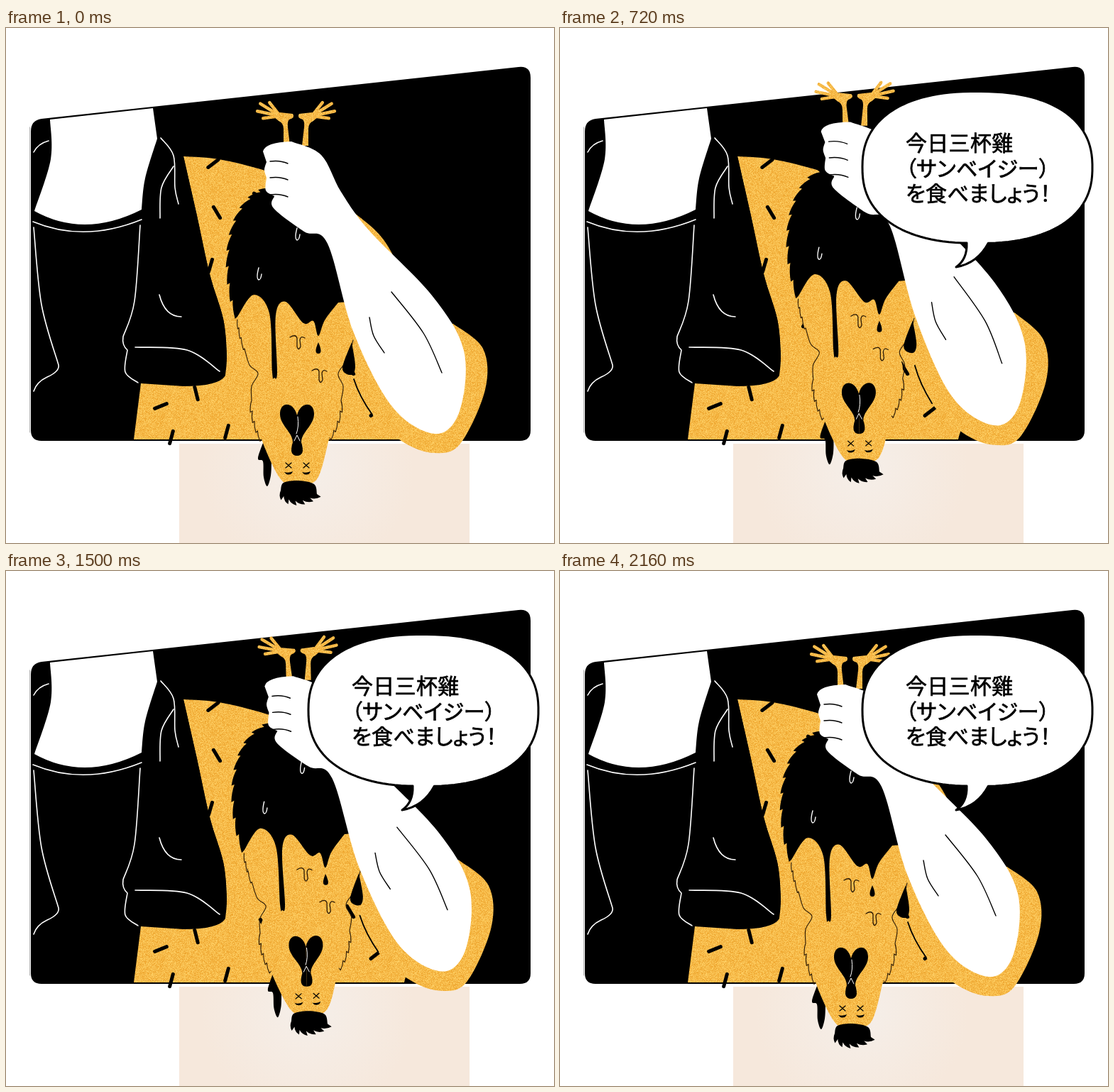
Recreate the animation shown at these times as an HTML page with a canvas. Size 772 by 726 pixels, loop 2340 ms.

```html
<!DOCTYPE html>
<html lang="ja">
<head>
<meta charset="utf-8">
<style>
html, body { margin: 0; width: 100%; height: 100%; overflow: hidden; background: #fff; }
canvas { position: absolute; left: 0; top: 0; }
#words {
  position: absolute; left: 487px; top: 143px; color: #000; white-space: pre;
  font: 500 30px/35.5px "Noto Sans CJK JP", "Noto Sans CJK", sans-serif;
  font-feature-settings: "palt"; letter-spacing: .3px; -webkit-text-stroke: .7px #000;
}
</style>
</head>
<body>
<canvas id="stage" width="772" height="726"></canvas>
<div id="words">今日三杯雞
（サンベイジー）
を食べましょう！</div>
<script>
const ctx = document.getElementById('stage').getContext('2d');
const words = document.getElementById('words');
const LOOP = 2340, STEP = 60;
const BLACK = '#000', WHITE = '#fff', INK = '#2b1a05';

// Seeded grain used for every yellow surface
function makeGrain() {
  const size = 160, tile = document.createElement('canvas');
  tile.width = tile.height = size;
  const g = tile.getContext('2d'), img = g.createImageData(size, size);
  let seed = 7;
  for (let i = 0; i < img.data.length; i += 4) {
    seed = (seed * 16807) % 2147483647;
    const n = seed / 2147483647 - 0.5;
    img.data.set([246 + n * 18, 186 + n * 44, 73 + n * 56, 255], i);
  }
  g.putImageData(img, 0, 0);
  return ctx.createPattern(tile, 'repeat');
}
const YELLOW = makeGrain();

// Point transforms
const still = (x, y) => [x, y];
const shift = (w, dx, dy) => (x, y) => w(x + dx, y + dy);
const mirror = (w, axis) => (x, y) => w(2 * axis - x, y);

// Maps the bone a-b onto a2-b2: stretches along it, bows sideways
function makeWarp(a, b, a2, b2, bend) {
  const dx = b[0] - a[0], dy = b[1] - a[1], rest = Math.hypot(dx, dy);
  const ex = b2[0] - a2[0], ey = b2[1] - a2[1], len = Math.hypot(ex, ey);
  return (x, y) => {
    const px = x - a[0], py = y - a[1];
    const u = (px * dx + py * dy) / rest ** 2;
    const v = ((px * dy - py * dx) / rest + bend * Math.max(0, 4 * u * (1 - u))) / len;
    return [a2[0] + u * ex + v * ey, a2[1] + u * ey - v * ex];
  };
}

// Absolute path commands; R is a smooth curve through its points
function trace(d, warp) {
  let cur;
  ctx.beginPath();
  for (const [, cmd, args] of d.matchAll(/([MLQCRZ])([^MLQCRZ]*)/g)) {
    const n = (args.match(/-?[\d.]+/g) || []).map(Number), pts = [];
    for (let i = 0; i < n.length; i += 2) pts.push(warp(n[i], n[i + 1]));
    if (cmd === 'Z') { ctx.closePath(); continue; }
    if (cmd === 'M') ctx.moveTo(...pts[0]);
    if (cmd === 'L') pts.forEach(p => ctx.lineTo(...p));
    if (cmd === 'Q') ctx.quadraticCurveTo(...pts.flat());
    if (cmd === 'C') ctx.bezierCurveTo(...pts.flat());
    if (cmd === 'R') {
      const k = [cur, ...pts];
      for (let i = 0; i < k.length - 1; i++) {
        const p = k[Math.max(i - 1, 0)], q = k[i], r = k[i + 1];
        const s = k[Math.min(i + 2, k.length - 1)];
        ctx.bezierCurveTo(
          q[0] + (r[0] - p[0]) / 6, q[1] + (r[1] - p[1]) / 6,
          r[0] - (s[0] - q[0]) / 6, r[1] - (s[1] - q[1]) / 6, r[0], r[1]);
      }
    }
    cur = pts[pts.length - 1];
  }
}
function fill(d, color, warp = still) {
  trace(d, warp);
  ctx.fillStyle = color;
  ctx.fill();
}
function line(d, color, width, warp = still) {
  trace(d, warp);
  ctx.strokeStyle = color;
  ctx.lineWidth = width;
  ctx.stroke();
}

// Tufts along a cubic curve, continuing the current path
function fur(c, count, depth) {
  const at = t => [0, 1].map(k => (1 - t) ** 3 * c[k] + 3 * t * (1 - t) ** 2 * c[k + 2] +
    3 * t * t * (1 - t) * c[k + 4] + t ** 3 * c[k + 6]);
  let d = '';
  for (let i = 1; i <= count; i++) {
    const a = at((i - 1) / count), b = at(i / count);
    const len = Math.hypot(b[0] - a[0], b[1] - a[1]);
    const tx = (b[0] - a[0]) / len, ty = (b[1] - a[1]) / len, lean = Math.abs(depth) / 2;
    const out = [
      (a[0] + b[0]) / 2 + ty * depth, (a[1] + b[1]) / 2 - tx * depth,
      b[0] + ty * depth + tx * lean, b[1] - tx * depth + ty * lean, ...b
    ].map(n => n.toFixed(1));
    d += `Q${out.slice(0, 4).join(' ')} L${out.slice(4).join(' ')} `;
  }
  return d;
}

// Eases from one turning point [time, value] to the next
function sway(turns, s) {
  let i = 1;
  while (i < turns.length - 1 && s > turns[i][0]) i++;
  const [t0, a] = turns[i - 1], [t1, b] = turns[i];
  const u = Math.min(Math.max((s - t0) / (t1 - t0), 0), 1);
  return a + (b - a) * (1 - Math.cos(Math.PI * u)) / 2;
}

// One shake: everything follows the hand's drop, the head's swing and the elbow's push
function poseAt(t) {
  const start = t < 1140 ? 60 : 1140, s = t - start, end = t < 1140 ? 900 : 1020;
  const drop = sway([[45, 0], [200, 55], [405, -20], [575, 57], [680, -36], [end, 0]], s);
  const swing = sway([[45, 0], [280, 30], [450, -5], [630, 12], [end, 0]], s);
  const push = sway([[45, 0], [220, 27], [360, 8], [560, 20], [700, 6], [end, 0]], s);
  const fist = [362, 172], elbow = [614, 486], feet = [408, 124], head = [410, 617];
  const move = (p, dx, dy) => [p[0] + dx, p[1] + dy];
  return {
    arm: makeWarp(fist, elbow, move(fist, -0.2 * drop, drop),
      move(elbow, push, 0.27 * drop - 0.65 * push), -0.22 * drop),
    bird: makeWarp(feet, head, move(feet, -0.24 * drop, drop),
      move(head, swing, 0.9 * drop - 0.5 * swing), 0)
  };
}

function drawRoom() {
  ctx.fillStyle = WHITE;
  ctx.fillRect(0, 0, 772, 726);
  const glow = ctx.createRadialGradient(425, 620, 10, 425, 620, 150);
  glow.addColorStop(0, '#f5eee8');
  glow.addColorStop(1, '#f6e8dc');
  ctx.fillStyle = glow;
  ctx.fillRect(244, 586, 409, 140);
  line('M33.5 140 L33.5 570', '#aaa', 1);
  fill('M35 146 Q35 130 50 128 L722 55 Q739 53 739 70 L739 567 Q739 582 724 582 L50 582 Q35 582 35 567 Z', BLACK);
}

function drawRug() {
  fill('M250 181 R268 260 287 347 306 410 311 460 309 490 Q300 505 250 505 L190 501 L180 580 L561 580 ' +
    'R588 460 545 320 490 260 430 224 365 201 300 185 250 181 Z', YELLOW);
  const dash = (x, y, degrees) => {
    const a = degrees * Math.PI / 180, dx = 9 * Math.cos(a), dy = 9 * Math.sin(a);
    line(`M${x - dx} ${y - dy} L${x + dx} ${y + dy}`, BLACK, 5);
  };
  [[292, 191, -37], [297, 260, 59], [288, 335, -74], [218, 533, -22], [268, 515, 76], [233, 577, -75],
    [311, 569, -75], [357, 238, 33], [363, 499, 59], [521, 541, -38], [485, 480, 59], [347, 413, -60],
    [556, 347, -38]].forEach(d => dash(...d));
  ctx.fillStyle = BLACK;
  ctx.fillRect(180, 580, 382, 2);
  fill('M250 181 R268 260 287 347 306 410 311 460 L250 470 Z', BLACK);
}

function drawLeg() {
  fill('M62 129 R63 185 40 258 Q110 297 191 256 R196 212 213 156 L207 113 Z', WHITE);
  const seam = d => line(d, WHITE, 1.6);
  seam('M39 175 Q45 163 60 159');
  seam('M218 155 R236 180 238 225 243 248');
  seam('M236 195 R219 225 217 268');
  seam('M38 273 Q110 303 191 270');
  seam('M39 281 R50 390 74 475 Q76 484 58 492 Q43 499 39 512');
  seam('M189 278 R181 385 165 435 Q163 447 171 454 R168 485 186 500');
  seam('M182 450 R255 454 301 484');
  seam('M216 376 Q224 407 247 407');
}

function drawFeet(w) {
  fill('M391 166 L391 142 Q391 134 384 131 L376 124 L386 119 L404 121 Q408 126 399 129 Q396 132 397 140 L400 166 Z', YELLOW, w);
  for (let i = 0; i < 4; i++) {
    const a = (172 + 20 * i) * Math.PI / 180, len = 24 + 10 * Math.sin(Math.PI * i / 3);
    line(`M386 124 L${386 + len * Math.cos(a)} ${124 + len * Math.sin(a)}`, YELLOW, 4.5, w);
  }
}

function drawFace(w) {
  for (const half of [w, mirror(w, 410)]) {
    fill('M410 546 C405 526 386 526 386 544 C386 560 404 570 404 584 Q398 603 410 603 Z', BLACK, half);
  }
  line('M411 548 Q413 562 409 572 M406 582 L410 574 L414 582', WHITE, 1, w);
  for (const eye of [w, shift(w, 25, 0)]) {
    line('M394 613 L402 620 M402 613 L394 620', BLACK, 1.2, eye);
    fill('M392 626 Q398 628 404 625 Q402 631 395 629 Z', BLACK, eye);
  }
  fill('M438 657 R434 643 412 638 391 641 387 652 L387 652 ' +
    fur([387, 652, 392, 671, 420, 670, 438, 657], 6, -6) + 'Z', BLACK, w);
}

function drawBird(w) {
  drawFeet(w);
  drawFeet(mirror(w, 408.5));
  fill('M366 575 R355 606 362 611 363 633 368 646 373 631 374 611 L385 590 Z', BLACK, w);
  fill('M326 395 R335 455 355 487 346 525 360 580 387 636 410 642 438 636 455 580 472 515 468 487 487 440 L500 380 Z', YELLOW, w);

  // Feather outline
  line('M326 411 ' + fur([326, 411, 328, 422, 330, 435, 336, 452], 3, -2) + 'R343 475 355 487 346 505 346 525 ' +
    fur([346, 525, 346, 545, 352, 565, 360, 580], 4, -3), INK, 1.1, w);
  line('M489 440 R482 466 468 487 475 505 472 525 ' +
    fur([472, 525, 472, 545, 464, 565, 456, 578], 4, 3), INK, 1.1, w);
  fill('M487 443 R474 480 487 489 492 476 487 443 Z', BLACK, w);

  // Dark plumage with drips
  fill('M375 226 ' + fur([375, 226, 315, 235, 300, 330, 326, 407], 10, -4) +
    'R349 376 371 402 375 485 378 493 382 485 380 405 394 386 419 416 433 413 440 434 449 412 468 387 ' +
    'L500 385 L470 290 L420 222 Z', BLACK, w);
  fill('M440 443 Q447 459 440 459 Q433 459 440 443 Z', BLACK, w);
  for (const spot of [w, shift(w, 54, -56)]) {
    line('M356 338 Q352 353 356 355 Q359 355 360 347', WHITE, 1.4, spot);
  }
  for (const spot of [w, shift(w, 31, 47)]) {
    line('M400 436 Q408 431 410 437 L410 449 Q412 456 415 449 L414 440 Q415 433 421 437', INK, 1.3, spot);
  }
  drawFace(w);
}

function drawArm(w) {
  fill('M600 415 L630 417 R672 452 675 510 640 586 603 599 560 584 516 545 490 495 L540 480 Z', YELLOW, w);
  line('M490 495 Q498 520 516 545', BLACK, 1.8, w);
  fill('M362 174 Q365 161 402 160 R444 179 472 231 512 286 600 377 645 455 639 540 605 572 545 535 490 430 453 304 ' +
    '420 287 377 254 378 237 R366 229 367 211 R364 200 367 189 Z', WHITE, w);
  for (const y of [188, 211, 235]) line(`M372 ${y} Q386 ${y - 2} 397 ${y + 3}`, BLACK, 1.4, w);
  line('M512 408 R518 434 533 458 M543 372 R588 430 614 486', BLACK, 1.4, w);
}

function drawBubble() {
  const bulge = v => Math.sign(v) * Math.abs(v) ** (2 / 2.35);
  const cx = 588, cy = 196.5;
  ctx.beginPath();
  for (let i = 0; i <= 120; i++) {
    const a = Math.PI * (0.53 + i / 120 * 1.95);
    ctx.lineTo(cx + 162 * bulge(Math.cos(a)), cy + 107 * bulge(Math.sin(a)));
  }
  ctx.quadraticCurveTo(588, 332, 558, 337);
  ctx.quadraticCurveTo(574, 326, 573, 303);
  ctx.closePath();
  ctx.fillStyle = WHITE;
  ctx.fill();
  ctx.strokeStyle = BLACK;
  ctx.lineWidth = 3;
  ctx.stroke();
}

function frame(now) {
  const t = Math.floor((now % LOOP) / STEP) * STEP;
  const pose = poseAt(t), shown = Math.min(Math.max((t - 540) / 120, 0), 1);
  drawRoom();
  drawRug();
  drawLeg();
  drawBird(pose.bird);
  drawArm(pose.arm);
  ctx.globalAlpha = shown;
  drawBubble();
  ctx.globalAlpha = 1;
  words.style.opacity = shown;
}

ctx.lineCap = ctx.lineJoin = 'round';
const began = performance.now();
function tick() {
  frame(performance.now() - began);
  requestAnimationFrame(tick);
}
tick();
</script>
</body>
</html>
```
